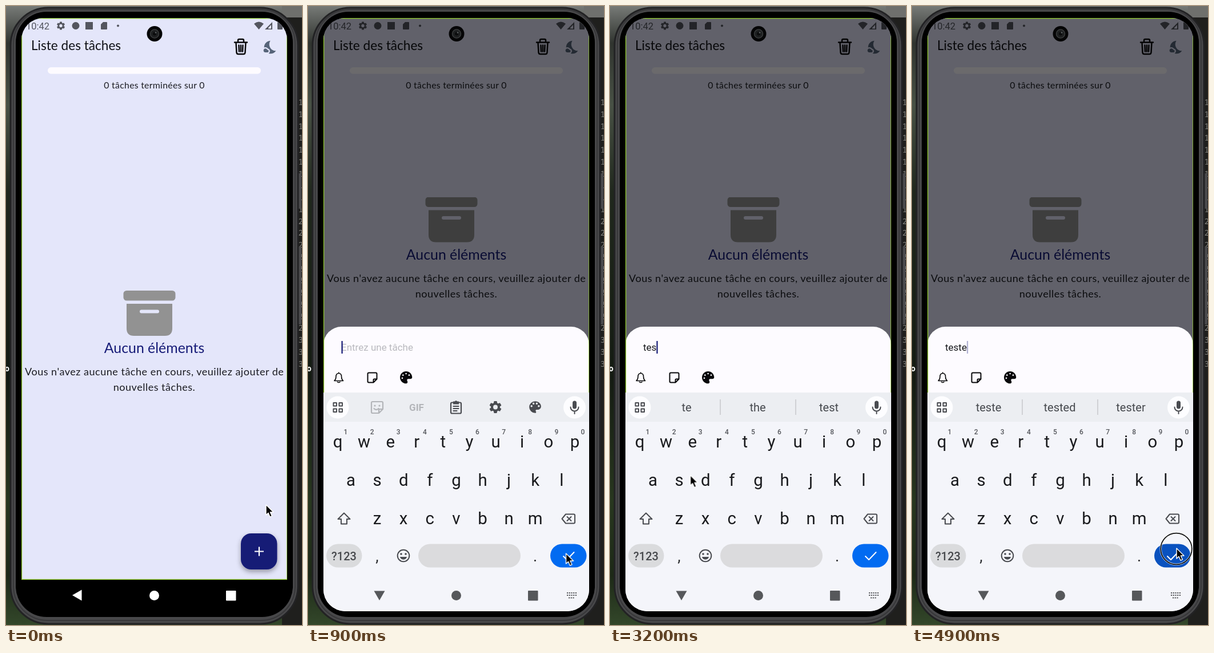
Write an HTML page that moves like this. It is 518 by 1081 pixels and loops after 5000 ms.

```html
<!DOCTYPE html>
<html lang="fr">
<head>
<meta charset="utf-8">
<title>Liste des tâches</title>
<style>
html, body { margin: 0; width: 100%; height: 100%; overflow: hidden; background: #1f1f1d; }
svg { display: block; width: 518px; height: 1081px; }
text { white-space: pre; }
.lato { font-family: Lato, sans-serif; text-anchor: middle; }
.roboto { font-family: Roboto, sans-serif; }
.mid { text-anchor: middle; }
.line { fill: none; stroke: currentColor; stroke-linecap: round; stroke-linejoin: round; }
.anim { animation: 5s linear infinite; }
.step { animation: 5s step-end infinite; }

#cursor { animation-name: point; }
#ring { animation-name: click; }
#keyboard { animation-name: rise; }
#empty { animation-name: lift; }
#modal { animation-name: show; }
#navBack { animation-name: navFill; }
#navIcons { animation-name: navInk; }
#back { animation-name: turn; transform-origin: 125px 1029px; }
#hideKeys { animation-name: appear; }
#enter { animation-name: press; }

@keyframes point {
  0%, 2% { transform: translate(455px, 871px); }
  8%, 18.4% { transform: translate(451.5px, 956px); }
  22% { transform: translate(420px, 925px); }
  30% { transform: translate(250px, 800px); }
  34% { transform: translate(170px, 757px); }
  36% { transform: translate(185px, 758px); }
  42%, 46% { transform: translate(236px, 766px); }
  50%, 54.4% { transform: translate(139px, 765px); }
  60%, 63% { transform: translate(121px, 830px); }
  69%, 73% { transform: translate(236px, 768px); }
  76% { transform: translate(216px, 781px); }
  83%, 87% { transform: translate(144px, 768px); }
  96%, 100% { transform: translate(463px, 947px); }
}
@keyframes click {
  0%, 12.4%, 45.8%, 53%, 63%, 72.8%, 86.8% { opacity: 0; }
  9.6%, 43%, 50%, 60%, 70%, 84%, 97% { opacity: 1; }
}
@keyframes rise {
  0%, 11% { transform: translateY(390px); opacity: 0; }
  12% { transform: translateY(300px); opacity: .8; }
  14% { transform: translateY(70px); opacity: .9; }
  16% { transform: translateY(3.5px); opacity: .96; }
  17.8%, 100% { transform: none; opacity: 1; }
}
@keyframes lift { 0% { transform: none; } 17.8%, 100% { transform: translateY(-163.5px); } }
@keyframes show { 0% { visibility: hidden; } 17.8%, 100% { visibility: visible; } }
@keyframes navFill { 0%, 12% { fill: #000; } 14%, 17% { fill: #e0e1e2; } 17.8%, 100% { fill: #f4f5fa; } }
@keyframes navInk { 0%, 12% { color: #fff; } 14%, 100% { color: #56585b; } }
@keyframes turn { 0%, 12% { transform: none; } 16% { transform: rotate(-75deg); } 17.8%, 100% { transform: rotate(-90deg); } }
@keyframes appear { 0%, 12% { opacity: 0; } 14%, 100% { opacity: 1; } }
@keyframes press { 0% { fill: #026bf1; } 97%, 100% { fill: #0a52bf; } }
</style>
</head>
<body>
<svg viewBox="0 0 518 1081">
  <defs>
    <linearGradient id="forest" x2="0" y2="1">
      <stop offset="0" stop-color="#777a77"/><stop offset=".06" stop-color="#30342f"/>
      <stop offset=".16" stop-color="#485145"/><stop offset=".3" stop-color="#20281d"/>
      <stop offset=".6" stop-color="#141b12"/><stop offset=".8" stop-color="#28371f"/>
      <stop offset=".92" stop-color="#1d2917"/><stop offset="1" stop-color="#33472a"/>
    </linearGradient>
    <clipPath id="screen"><rect x="27" y="21" width="465" height="1036" rx="38"/></clipPath>
    <filter id="shadow" x="-30%" y="-30%" width="160%" height="170%">
      <feDropShadow dx="0" dy="4" stdDeviation="4" flood-opacity=".35"/>
    </filter>
    <path id="gear" fill="currentColor" transform="translate(-12 -12)" d="M19.140 12.940c.04-.3.06-.61.06-.94 0-.32-.02-.64-.07-.94l2.030-1.580c.18-.14.23-.41.12-.61l-1.920-3.320c-.12-.22-.37-.29-.59-.22l-2.390.96c-.5-.38-1.030-.7-1.620-.94l-.36-2.540c-.04-.24-.24-.41-.48-.41h-3.840c-.24 0-.43.17-.47.41l-.36 2.540c-.59.24-1.130.57-1.620.94l-2.390-.96c-.22-.08-.47 0-.59.22L2.740 8.870c-.12.21-.08.47.12.61l2.030 1.580c-.05.3-.09.63-.09.94s.02.64.07.94l-2.030 1.580c-.18.14-.23.41-.12.61l1.920 3.320c.12.22.37.29.59.22l2.390-.96c.5.38 1.030.7 1.620.94l.36 2.540c.05.24.24.41.48.41h3.840c.24 0 .44-.17.47-.41l.36-2.540c.59-.24 1.130-.56 1.620-.94l2.390.96c.22.08.47 0 .59-.22l1.920-3.320c.12-.22.07-.47-.12-.61zM12 15.600a3.600 3.600 0 1 1 0-7.200 3.600 3.600 0 0 1 0 7.200z"/>
    <path id="palette" fill="currentColor" fill-rule="evenodd" d="M0-9a9 9 0 0 0 0 18c.83 0 1.500-.67 1.500-1.500 0-.39-.15-.74-.39-1.010-.23-.26-.38-.61-.38-.99 0-.83.67-1.500 1.500-1.500H4c2.760 0 5-2.240 5-5 0-4.420-4.030-8-9-8zM-5.500-3a1.500 1.500 0 1 0 0 3 1.500 1.500 0 0 0 0-3zM-2.500-7a1.500 1.500 0 1 0 0 3 1.500 1.500 0 0 0 0-3zM2.500-7a1.500 1.500 0 1 0 0 3 1.500 1.500 0 0 0 0-3zM5.500-3a1.500 1.500 0 1 0 0 3 1.500 1.500 0 0 0 0-3z"/>
  </defs>

  <!-- Desktop and phone body -->
  <rect width="518" height="1081" fill="#1f1f1d"/>
  <rect width="483" height="1081" fill="url(#forest)"/>
  <rect x="483" width="35" height="20" fill="#6f706d"/>
  <text class="roboto" x="-2" y="638" font-size="14" font-weight="700" fill="#fff">o</text>
  <g id="lines" fill="#83837f" font-family="Noto Sans Mono, monospace" font-size="14"></g>
  <path d="M510 292h5q2 0 2 3v56q0 3-2 3h-5zM510 420h5q2 0 2 3v130q0 3-2 3h-5z" fill="#4b4b4d"/>
  <rect x="8" y="3" width="503" height="1076" rx="66" fill="#48484a" stroke="#222224" stroke-width="3"/>
  <rect x="13" y="6" width="493" height="1067" rx="60" fill="none" stroke="#373739" stroke-width="2"/>
  <rect x="17" y="10" width="485" height="1057" rx="54" fill="#000"/>

  <g clip-path="url(#screen)">
    <rect x="27" y="21" width="465" height="981" fill="#e4e6fa"/>

    <!-- Status bar -->
    <g color="#54565f" fill="#54565f">
      <text class="roboto" x="35" y="41" font-size="16.5">10:42</text>
      <use href="#gear" transform="translate(96 34.5) scale(.74)"/>
      <circle cx="122" cy="34.5" r="6.5"/>
      <rect x="139" y="28" width="13" height="13"/>
      <path d="M170 28h6q1 0 1 1v11q0 1-1 1h-9q-1 0-1-1v-8z"/>
      <circle cx="196" cy="34.5" r="2"/>
      <path d="M434 31q8.500-7 17 0l-8.500 10z"/>
      <path d="M466 28v13h-13zM464 33l-5 5v1.500h5z" fill-rule="evenodd"/>
      <rect x="475" y="28" width="9" height="13" rx="1"/>
    </g>

    <!-- Header -->
    <text class="lato" x="44" y="77" font-size="22.6" fill="#111217" style="text-anchor:start">Liste des tâches</text>
    <g class="line" color="#08080a" stroke-width="2.5">
      <path d="M400 63.500h22M406 63v-3q0-2 2-2h6q2 0 2 2v3M402.500 64l1 17q.2 3 3 3h9q2.800 0 3-3l1-17M407.500 68.500l.5 11M411 68.500v11M414.500 68.500l-.5 11"/>
    </g>
    <path transform="translate(449.500 58.500) scale(1.13)" fill="#566479" d="M11.100 12.080C8.770 7.570 10.600 3.600 11.630 2.010 6.270 2.200 1.980 6.590 1.980 12c0 .14.02.28.02.42C2.620 12.150 3.290 12 4 12c1.660 0 3.180.83 4.100 2.150C9.770 14.630 11 16.170 11 18c0 1.520-.87 2.830-2.120 3.510.98.32 2.030.5 3.110.5 3.500 0 6.580-1.800 8.370-4.520-2.360.23-6.980-.97-9.260-5.410zM7 16h-.18C6.400 14.840 5.300 14 4 14c-1.660 0-3 1.340-3 3s1.340 3 3 3h3a2 2 0 0 0 0-4z"/>
    <rect x="73" y="107" width="373" height="11.5" rx="5.7" fill="#fdfbff"/>
    <text class="lato" x="259.5" y="144" font-size="15.82" letter-spacing=".28" fill="#1c1d23">0 tâches terminées sur 0</text>

    <!-- Empty list -->
    <g id="empty" class="step">
      <rect x="205.500" y="497" width="91" height="17.500" rx="5.500" fill="#929292"/>
      <path d="M211 520h80v43q0 13-13 13h-54q-13 0-13-13z" fill="#929292"/>
      <rect x="234" y="530.500" width="34" height="6" rx="3" fill="#e4e6fa"/>
      <text class="lato" x="259.5" y="606" font-size="24.86" fill="#171c78">Aucun éléments</text>
      <g class="lato" font-size="18.08" letter-spacing=".48" fill="#1c1d23">
        <text x="259.700" y="645">Vous n'avez aucune tâche en cours, veuillez ajouter de</text>
        <text x="259.500" y="672">nouvelles tâches.</text>
      </g>
    </g>

    <rect x="411" y="921" width="63.500" height="63" rx="18" fill="#151a76" filter="url(#shadow)"/>
    <path d="M435 952.500h16M443 944.500v16" stroke="#fff" stroke-width="2.200"/>

    <!-- Task entry sheet -->
    <g id="modal" class="step">
      <rect x="27" y="21" width="465" height="981" fill="#000" opacity=".575"/>
      <rect x="27" y="560" width="465" height="200" rx="31.700" fill="#fdfbff"/>
      <text id="hint" class="roboto" x="58" y="602" font-size="17" fill="#b9b9be">Entrez une tâche</text>
      <text id="typed" class="roboto" x="58" y="602" font-size="17" fill="#15161a"></text>
      <rect id="caret" y="585" width="2.200" height="22" fill="#171c78"/>
      <g color="#08080a">
        <path class="line" stroke-width="1.600" d="M46 654.500q3-2.500 3-7 0-6 4.800-6t4.800 6q0 4.500 3 7zM51.500 656.500q2.300 2 4.600 0M53.800 640v1"/>
        <path class="line" stroke-width="2" d="M106.500 640.500h12q2 0 2 2v9l-6 6h-8q-2 0-2-2v-13q0-2 2-2zM120.500 651.500h-4.500q-1.500 0-1.500 1.500v4.500"/>
        <path fill="currentColor" transform="translate(161 638) scale(.0415)" d="M512 256v3c0 36-34 61-70 61h-98c-26 0-48 22-48 48 0 14 6 26 12 40 6 14 12 27 12 42 0 32-22 61-54 62h-10a256 256 0 1 1 256-256zM128 288a32 32 0 1 0-64 0 32 32 0 1 0 64 0zm0-96a32 32 0 1 0 0-64 32 32 0 1 0 0 64zM288 96a32 32 0 1 0-64 0 32 32 0 1 0 64 0zm96 96a32 32 0 1 0 0-64 32 32 0 1 0 0 64z" fill-rule="evenodd"/>
      </g>
    </g>
    <rect x="27.500" y="21.500" width="464.500" height="980" fill="none" stroke="#8fc92b" stroke-width="1.500"/>

    <!-- Keyboard -->
    <g id="keyboard" class="anim" color="#494b50">
      <rect x="27" y="675" width="465" height="400" fill="#f4f5fa"/>
      <rect x="27" y="675" width="465" height="51" fill="#eceef2"/>
      <circle cx="52" cy="701" r="19.500" fill="#fdfdff"/>
      <circle cx="466.500" cy="701" r="19.500" fill="#fdfdff"/>
      <path class="line" stroke-width="2" d="M44.500 693h5.500v5.500h-5.500zM54.500 693h5.500v5.500h-5.500zM44.500 703.500h5.500v5.500h-5.500zM54.500 703.500h5.500v5.500h-5.500z"/>
      <rect x="463" y="689.500" width="7" height="14" rx="3.500" fill="currentColor"/>
      <path class="line" stroke-width="2" d="M459.500 700.500a7 7 0 0 0 14 0M466.500 708v4"/>

      <g id="tools">
        <g color="#b3b5b9">
          <path class="line" stroke-width="2.200" d="M113 691h16q2 0 2 2v11l-7 7h-11q-2 0-2-2v-16q0-2 2-2zM131 704h-5q-2 0-2 2v5M115.500 703q4 4 8 0"/>
          <circle cx="117" cy="698" r="1.600" fill="currentColor"/><circle cx="125" cy="698" r="1.600" fill="currentColor"/>
          <text class="roboto mid" x="190" y="707" font-size="17" font-weight="700" fill="currentColor">GIF</text>
        </g>
        <path class="line" stroke-width="2.200" d="M252 692.500h14q2 0 2 2v15q0 2-2 2h-14q-2 0-2-2v-15q0-2 2-2zM254.500 699h9M254.500 703h9M254.500 707h6"/>
        <path d="M254 690.500h3a2.300 2.300 0 0 1 4 0h3v5h-10z" fill="currentColor"/>
        <use href="#gear" transform="translate(328 700.500) scale(1.1)"/>
        <use href="#palette" transform="translate(397.500 700.500) scale(1.15)"/>
      </g>
      <g id="words" class="roboto mid" font-size="20" fill="#46494e">
        <path d="M193 687v27M325 687v27" stroke="#c6c8cc" stroke-width="1.500"/>
        <text x="134" y="708"></text><text x="258.500" y="708"></text><text x="383" y="708"></text>
      </g>

      <g id="keys" class="roboto mid" font-size="29.4" fill="#191a1d"></g>
      <path class="line" stroke-width="2" d="M63 885.500l10.500 10.500h-5.500v8.500h-10v-8.500h-5.500z"/>
      <path class="line" stroke-width="2" d="M451 887.500h14q2 0 2 2v12q0 2-2 2h-14l-6.500-8zM453.500 892l7 7M460.500 892l-7 7"/>
      <rect x="32" y="939.500" width="62.500" height="41" rx="20.500" fill="#dadbdd"/>
      <rect x="193" y="939.500" width="179" height="41" rx="20.500" fill="#dbdbdd"/>
      <rect id="enter" class="step" x="424" y="939.500" width="63.500" height="41" rx="20.500" fill="#026bf1"/>
      <path class="line" color="#fff" stroke-width="2" d="M447 961l6 6 12.500-13"/>
      <text class="roboto mid" x="63" y="967.500" font-size="20" font-weight="500" fill="#46484c">?123</text>
      <g class="roboto mid" font-size="27" fill="#2b2d30"><text x="121" y="970">,</text><text x="397.500" y="970">.</text></g>
      <circle class="line" cx="167" cy="960" r="10.300" stroke-width="2"/>
      <circle cx="163" cy="957" r="1.800" fill="currentColor"/><circle cx="171" cy="957" r="1.800" fill="currentColor"/>
      <path d="M161 962h12a6.200 6.200 0 0 1-12 0z" fill="currentColor"/>
    </g>

    <!-- Navigation bar -->
    <rect id="navBack" class="anim" x="27" y="1002.500" width="465" height="56"/>
    <g id="navIcons" class="anim" fill="currentColor">
      <path id="back" class="anim" d="M116 1029l16.500-9.500v19z" fill="currentColor"/>
      <circle cx="259.500" cy="1029.500" r="8.500" fill="currentColor"/>
      <rect x="385" y="1021" width="17.500" height="17.500" rx="1" fill="currentColor"/>
      <path id="hideKeys" class="anim" d="M453 1025h17M453 1029h17M456 1033.500h11" stroke="currentColor" stroke-width="2.200" stroke-dasharray="2.200 1.500" fill="none"/>
    </g>
  </g>

  <!-- Camera -->
  <circle cx="260" cy="48.500" r="13.500" fill="#050506"/>
  <circle cx="260" cy="48.500" r="7.500" fill="#1d1f20" stroke="#3a3c3d" stroke-width="1.500"/>
  <circle cx="260" cy="48.500" r="3" fill="#0b0c0d"/>
  <circle cx="262" cy="46.500" r="1.300" fill="#5c6061"/>

  <g id="cursor" class="anim">
    <g id="ring" class="step" fill="none">
      <circle cx="-.5" cy="1" r="27.300" stroke="#fff" stroke-width="3.500" opacity=".7"/>
      <circle cx="-.5" cy="1" r="27.300" stroke="#111" stroke-width="1.800"/>
    </g>
    <path d="M0 0v18l4-3.800 3 7 3.400-1.500-3-6.700h5.600z" fill="#000" stroke="#fff" stroke-width="1.400" stroke-linejoin="round"/>
  </g>
</svg>

<script>
const LOOP = 5000, SHEET_OPEN = 890, SUGGEST_DELAY = 120;
const byId = id => document.getElementById(id);

const typing = [[SHEET_OPEN, ''], [2250, 't'], [2650, 'te'], [3150, 'tes'], [3600, 'test'], [4300, 'teste']];
const suggestions = {
  t: ['t', 'the', 'thanks'],
  te: ['te', 'the', 'test'],
  tes: ['tes', 'test', 'yes'],
  test: ['test', 'teste', 'rest'],
  teste: ['teste', 'tested', 'tester']
};

function addText(parent, content, attrs) {
  const node = document.createElementNS('http://www.w3.org/2000/svg', 'text');
  for (const name in attrs) node.setAttribute(name, attrs[name]);
  node.textContent = content;
  parent.append(node);
}

for (let i = 0; i < 23; i++) {
  addText(byId('lines'), 1 + Math.floor(i / 10), { x: 511.5, y: 173 + 20.75 * i });
}

const KEY_STEP = 46.1;
[['qwertyuiop', 52, 770.5], ['asdfghjkl', 75, 837.5], ['zxcvbnm', 121, 904.5]].forEach(([row, left, y], r) => {
  [...row].forEach((letter, i) => {
    const x = left + KEY_STEP * i;
    addText(byId('keys'), letter, { x, y });
    if (r === 0) addText(byId('keys'), (i + 1) % 10, { x: x + 14, y: 748, 'font-size': 12, 'font-weight': 500, fill: '#55575c' });
  });
});

const latest = time => typing.findLast(([at]) => at <= time) || typing[0];

// Solid for half a second, then a soft fade out and back in.
function caretOpacity(elapsed) {
  const p = Math.max(0, elapsed) % 1000;
  if (p < 500) return 1;
  return p < 700 ? Math.max(0, 1 - (p - 500) / 150) : Math.min(1, Math.max(0, (p - 750) / 150));
}

const typed = byId('typed'), caret = byId('caret'), words = byId('words');
const labels = words.querySelectorAll('text');
let start;

function draw(now) {
  start ??= now;
  const time = (now - start) % LOOP;
  const [since, value] = latest(time);
  typed.textContent = value;
  byId('hint').style.display = value ? 'none' : '';
  caret.setAttribute('x', 58 + (value ? typed.getComputedTextLength() : 0.5));
  caret.style.opacity = caretOpacity(time - since);

  const offered = suggestions[latest(time - SUGGEST_DELAY)[1]];
  byId('tools').style.display = offered ? 'none' : '';
  words.style.display = offered ? '' : 'none';
  if (offered) labels.forEach((label, i) => label.textContent = offered[i]);
  requestAnimationFrame(draw);
}
requestAnimationFrame(draw);
</script>
</body>
</html>
```
